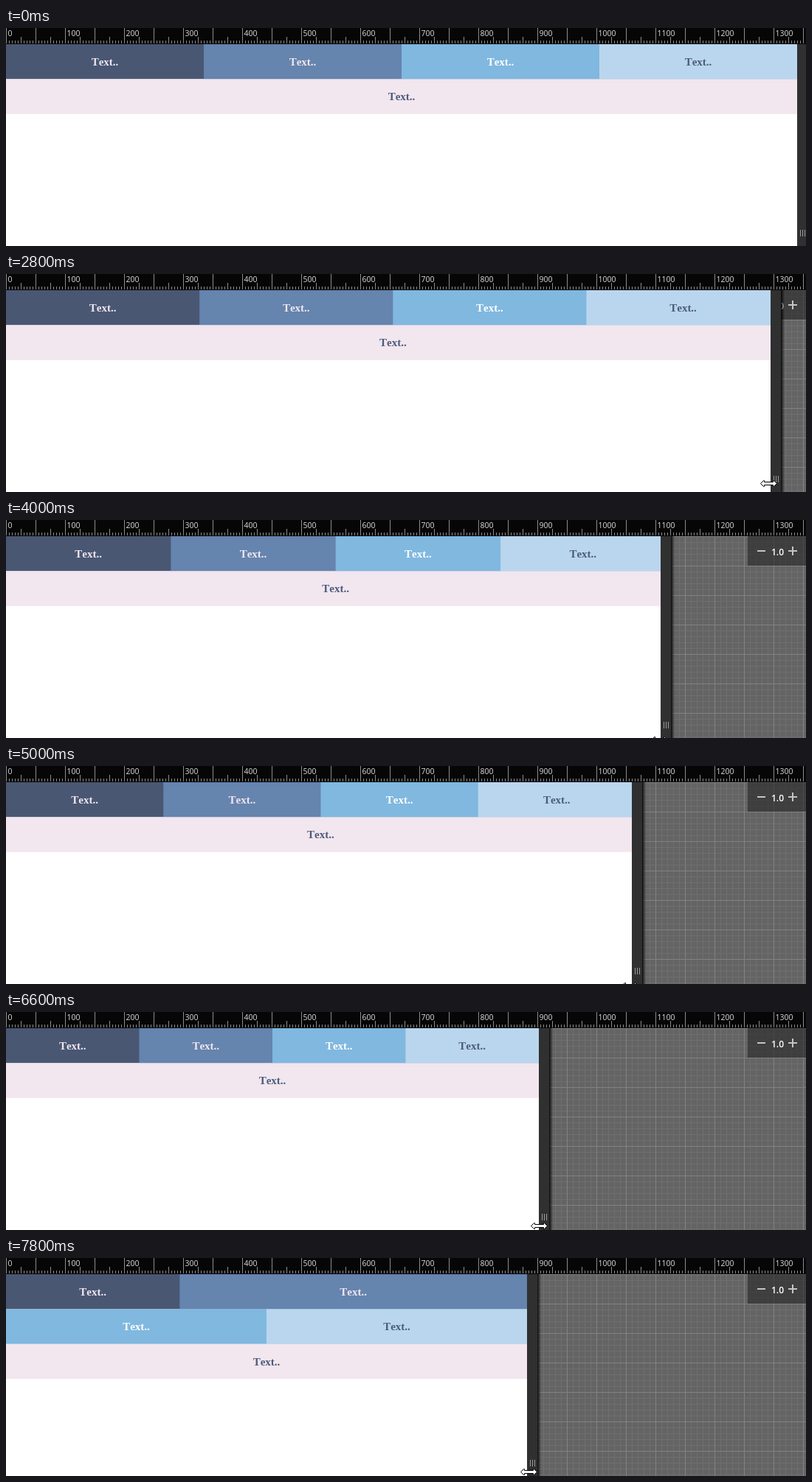
Recreate the animation shown at these times as an HTML page with a canvas. Size 1084 by 296 pixels, loop 8 s.

```html
<!DOCTYPE html>
<html lang="en">
<head>
<meta charset="utf-8">
<title>Responsive preview</title>
<style>
  html, body { margin: 0; width: 100%; height: 100%; overflow: hidden; background: #fff; }
  canvas { display: block; }
</style>
</head>
<body>
<canvas id="stage" width="1084" height="296"></canvas>
<script>
const WIDTH = 1084, HEIGHT = 296, LOOP = 8000, STEP = 200;
const RULER = 22, ROW = 47.4, BAR = 14, BREAKPOINT = 720;
const POINTER_IN = 600;
const ctx = document.getElementById('stage').getContext('2d');
ctx.fontKerning = 'none';

const DARK_TEXT = '#4b5b7b', PALE_TEXT = '#f1e6ef';
const CELLS = [
  ['#495773', PALE_TEXT],
  ['#6584ae', PALE_TEXT],
  ['#80b8df', '#fff'],
  ['#bad6ee', DARK_TEXT],
  ['#f2e6ef', DARK_TEXT]
];
// Relative cell widths, row by row
const WIDE = [[1, 1, 1, 1], [1]];
const NARROW = [[1, 2], [1, 1], [1]];

const span = (time, start, end) => Math.min(1, Math.max(0, (time - start) / (end - start)));
const smooth = p => p * p * (3 - 2 * p);
const easeOut = p => 1 - (1 - p) ** 1.3;

// One long drag, a second steady one that slows down, then a last nudge
function paneWidthAt(time) {
  return 1072
    - 208 * smooth(span(time, 2200, 4470))
    - 98 * span(time, 4840, 5800)
    - 58 * easeOut(span(time, 5800, 7000))
    - (time >= 7800 ? 2 : 0);
}

// The page reflows late; the wider it is, the longer it takes
function layoutWidthAt(time) {
  const delay = 0.4 * Math.max(0, paneWidthAt(time) - BREAKPOINT);
  return paneWidthAt(time - delay);
}

function pointerAt(time) {
  const approach = 7 * (1 - span(time, POINTER_IN, 1000));
  return {
    x: paneWidthAt(time + 50) + 2 + approach,
    y: 280 + approach + 19 * smooth(span(time, 2200, 3900)) - 8 * smooth(span(time, 5000, 5800))
  };
}

function rect(color, x, y, w, h) {
  ctx.fillStyle = color;
  ctx.fillRect(x, y, w, h);
}

function label(text, x, y, font, color, align = 'left') {
  ctx.font = font;
  ctx.fillStyle = color;
  ctx.textAlign = align;
  ctx.fillText(text, x, y);
}

function drawGrid() {
  rect('#646464', 0, RULER, WIDTH, HEIGHT);
  for (const [gap, color] of [[8, '#6f6f6f'], [40, '#828282']]) {
    for (let x = 0; x < WIDTH; x += gap) rect(color, x, RULER, 1, HEIGHT);
    for (let y = RULER; y < HEIGHT; y += gap) rect(color, 0, y, WIDTH, 1);
  }
}

function drawZoom() {
  const ink = '#c4c4c4';
  rect('rgba(38,38,38,0.6)', 1005, RULER, 79, 40);
  rect(ink, 1018, 41, 11, 2);
  rect(ink, 1060, 41, 12, 2);
  rect(ink, 1065, 36, 2, 12);
  label('1.0', 1045.5, 47.5, '600 12px "Open Sans", sans-serif', '#fff', 'center');
}

function drawPage(paneWidth, layoutWidth) {
  rect('#fff', 0, RULER, paneWidth, HEIGHT);
  let cell = 0;
  (layoutWidth > BREAKPOINT ? WIDE : NARROW).forEach((row, i) => {
    const top = RULER + i * ROW;
    const unit = layoutWidth / row.reduce((sum, weight) => sum + weight);
    let x = 0;
    for (const weight of row) {
      const [fill, ink] = CELLS[cell++];
      const width = weight * unit;
      rect(fill, x, top, layoutWidth - x, ROW);
      label('Text..', x + width / 2, Math.round(top) + 29,
        'bold 15px "Liberation Serif", serif', ink, 'center');
      x += width;
    }
  });
}

function drawBar(x) {
  const edge = x + BAR;
  const shadow = ctx.createLinearGradient(edge, 0, edge + 5, 0);
  shadow.addColorStop(0, 'rgba(0,0,0,0.9)');
  shadow.addColorStop(1, 'rgba(0,0,0,0)');
  rect(shadow, edge, RULER, 5, HEIGHT);
  rect('#303030', x, RULER, BAR, HEIGHT);
  for (const offset of [4, 7, 10]) rect('#9a9a9a', x + offset, 274, 1, 9);
}

function drawRuler() {
  rect('#060606', 0, 0, WIDTH, RULER);
  for (let x = 0; x < WIDTH; x += 4) {
    const top = x % 40 === 0 ? 0 : x % 20 === 0 ? 12 : 17;
    rect('#8c8c8c', x, top, 1, RULER - 1 - top);
  }
  for (let x = 0; x < WIDTH; x += 80) {
    label(x / 0.8, x + 2.5, 11, '10.5px "Open Sans", sans-serif', '#dcdcdc');
  }
}

function drawPointer({ x, y }) {
  const half = [[-11, 0], [-7, -4], [-6, -4], [-6, -2], [6, -2], [6, -4], [7, -4]];
  ctx.save();
  ctx.translate(Math.round(x) + 0.5, Math.round(y) - 0.5);
  ctx.beginPath();
  for (const sign of [1, -1]) {
    for (const [dx, dy] of half) ctx.lineTo(sign * dx, sign * dy);
  }
  ctx.closePath();
  ctx.fillStyle = '#fff';
  ctx.strokeStyle = '#000';
  ctx.fill();
  ctx.stroke();
  ctx.restore();
}

function draw(now) {
  const time = Math.floor(now % LOOP / STEP) * STEP;
  const paneWidth = Math.round(paneWidthAt(time));
  drawGrid();
  drawZoom();
  drawPage(paneWidth, layoutWidthAt(time));
  drawBar(paneWidth);
  drawRuler();
  if (time >= POINTER_IN) drawPointer(pointerAt(time));
}

const start = performance.now();
function tick() {
  draw(performance.now() - start);
  requestAnimationFrame(tick);
}
tick();
</script>
</body>
</html>
```
